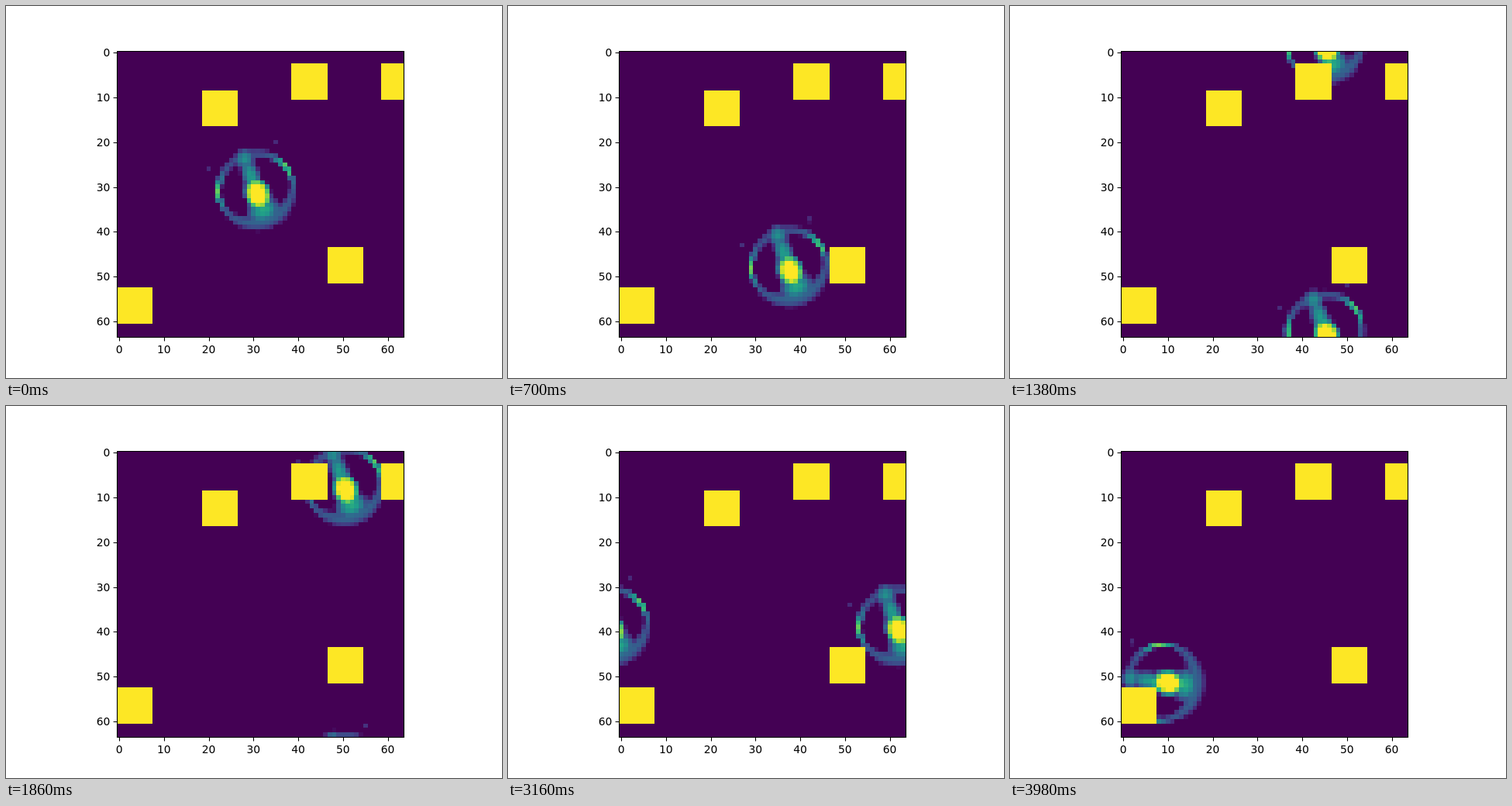
Write an HTML page with a canvas that moves like this. It is 640x480 px and loops after 4000 ms.

```html
<!DOCTYPE html>
<html lang="en">
<head>
<meta charset="utf-8">
<title>Drifting cell</title>
<style>
  html, body { margin: 0; width: 100%; height: 100%; overflow: hidden; background: #fff; }
  canvas, svg { position: absolute; left: 0; top: 0; width: 640px; height: 480px; }
  text { font: 13.89px "DejaVu Sans", sans-serif; }
</style>
</head>
<body>
<canvas id="field" width="640" height="480"></canvas>
<svg id="axes" viewBox="0 0 640 480"></svg>
<script>
const GRID = 64, LEFT = 143, TOP = 57, SIZE = 370;
const LOOP = 4000, STEP = 20, REACH = 13;
const TURN_START = 3160, TURN_END = 3980;

// top-left cells of the 8 x 8 blocks
const blocks = [[39, 3], [19, 9], [59, 3], [47, 44], [0, 53]];

// time and unwrapped centre
const path = [
  [0, 30.5, 30.5], [700, 37.4, 47.6], [1380, 45, 62], [1860, 50.2, 71.2],
  [2500, 55.5, 87.4], [3160, 61.5, 102.5], [3560, 66, 110.7], [3980, 72.9, 115.3]
];

const mix = (a, b, k) => a + (b - a) * k;
const clamp = k => Math.max(0, Math.min(1, k));

const viridis = "440154 482878 3e4989 31688e 26828e 1f9e89 35b779 6ece58 b5de2b fde725"
  .split(" ").map(h => [0, 2, 4].map(i => parseInt(h.slice(i, i + 2), 16)));

function colour(v) {
  const p = clamp(v) * (viridis.length - 1);
  const i = Math.min(viridis.length - 2, Math.floor(p));
  return `rgb(${viridis[i].map((c, n) => Math.round(mix(c, viridis[i + 1][n], p - i)))})`;
}

const bump = (du, dv, ru, rv, amp) => amp * (1 - (du / ru) ** 2 - (dv / rv) ** 2);

// u runs along the creature towards its front, v is the distance from its axis
function density(u, v) {
  const c = u / (Math.hypot(u, v) || 1);
  const front = Math.max(0, c) ** 2, back = Math.max(0, -c) ** 2;
  const fromSpot = Math.acos(c) * 180 / Math.PI - 105;
  const radius = 8.4 - 1.1 * front - 0.6 * back;
  const width = 0.75 + 1.6 * front + 0.5 * back;
  const glow = 0.25 + 0.08 * front + 0.55 * Math.exp(-((fromSpot / 20) ** 2));
  return Math.max(
    bump(Math.hypot(u, v) - radius, 0, width, 1, glow),
    bump(u + 7.2, v, 2.5, 2.6, 0.5),
    bump(u + 3, v, 5, 2.3, 0.55),
    bump(u - 1.2, v, 4.2, 3.2, 1.35),
    bump(u - 5, v, 3.2, 4.2, 0.6),
    bump(u + 8, v - 8, 0.8, 0.8, 0.15)
  );
}

function pose(t) {
  const i = path.findIndex((p, n) => n === path.length - 2 || t < path[n + 1][0]);
  const [t0, x0, y0] = path[i], [t1, x1, y1] = path[i + 1];
  const k = (t - t0) / (t1 - t0);
  const turn = clamp((t - TURN_START) / (TURN_END - TURN_START));
  return [mix(x0, x1, k), mix(y0, y1, k), mix(70, 7, turn) * Math.PI / 180];
}

const ctx = document.getElementById("field").getContext("2d");
ctx.rect(LEFT, TOP + 1, SIZE, SIZE);
ctx.clip();

function fillCells(col, row, size, paint) {
  const edge = (start, i) => Math.round(start + i * SIZE / GRID);
  const x = edge(LEFT, col), y = edge(TOP, row);
  ctx.fillStyle = paint;
  ctx.fillRect(x, y, edge(LEFT, col + size) - x, edge(TOP, row + size) - y);
}

function draw(t) {
  const [cx, cy, angle] = pose(t);
  const cos = Math.cos(angle), sin = Math.sin(angle);
  fillCells(0, 0, GRID, colour(0));
  for (let row = Math.floor(cy) - REACH; row <= cy + REACH; row++) {
    for (let col = Math.floor(cx) - REACH; col <= cx + REACH; col++) {
      const dx = col - cx, dy = row - cy;
      const value = density(dx * cos + dy * sin, Math.abs(dy * cos - dx * sin));
      if (value > 0.02) fillCells(col % GRID, row % GRID, 1, colour(value));
    }
  }
  for (const [col, row] of blocks) fillCells(col, row, 8, colour(1));
}

function buildAxes() {
  const snap = v => Math.floor(v + 0.5) + 0.5;
  let lines = "M143.5 58.5H513.5V427.5H143.5Z", labels = "";
  for (let n = 0; n <= 60; n += 10) {
    const x = 143.2 + 5.775 * (n + 0.5), y = 57.6 + 5.775 * (n + 0.5);
    lines += `M${snap(x)} 427.5V432.4M143.5 ${snap(y)}H138.6`;
    labels += `<text x="${x}" y="448" text-anchor="middle">${n}</text>` +
      `<text x="134.4" y="${Math.round(y) + 5}" text-anchor="end">${n}</text>`;
  }
  document.getElementById("axes").innerHTML =
    `<path d="${lines}" fill="none" stroke="#000" stroke-width="1.11"/>${labels}`;
}

buildAxes();
const begin = performance.now();
let shown = -1;

function tick() {
  const step = Math.floor((performance.now() - begin) % LOOP / STEP);
  if (step !== shown) draw((shown = step) * STEP);
  requestAnimationFrame(tick);
}
tick();
</script>
</body>
</html>
```
